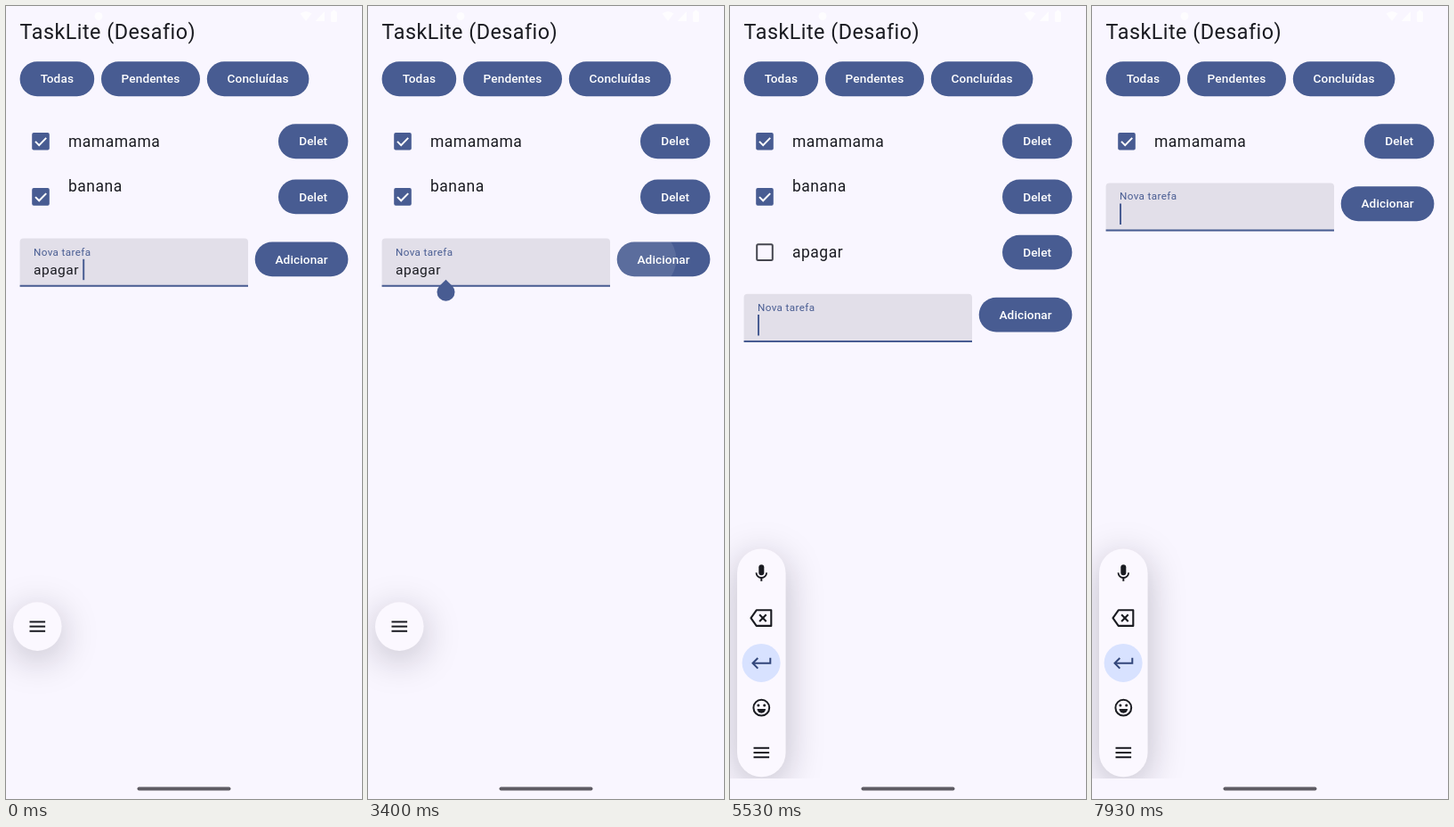
An HTML page with a canvas that plays this animation: 400 by 889 pixels, repeating every 8 s.

```html
<!DOCTYPE html>
<html lang="pt">
<head>
<meta charset="utf-8">
<title>Lista de tarefas</title>
<style>
  html, body { margin: 0; width: 100%; height: 100%; overflow: hidden; background: #f9f6ff; }
  canvas { display: block; width: 400px; height: 889px; }
</style>
</head>
<body>
<canvas id="stage"></canvas>
<script>
const W = 400, H = 889, LOOP = 8000;
const DP = 0.9728;
const BLUE = '#485c92', INK = '#1a1b21', BG = '#f9f6ff';
const ROW0 = 151.7, ROW = 62.2;

// Moments of the story, in ms
const HANDLE = 2470, PRESS = 3365, ADD = 3473, OPEN = 3600, DROP_1 = 6000, DROP_2 = 7870;
const BLINK = 499;

const canvas = document.getElementById('stage');
const ctx = canvas.getContext('2d');
const dpr = window.devicePixelRatio || 1;
canvas.width = W * dpr;
canvas.height = H * dpr;

const clamp = x => Math.max(0, Math.min(1, x));
const mix = (a, b, p) => a + (b - a) * p;
const easeOut = (x, n) => 1 - Math.pow(1 - x, n);

function box(x, y, w, h, r, color) {
  ctx.fillStyle = color;
  ctx.beginPath();
  ctx.roundRect(x, y, w, h, r);
  ctx.fill();
}

function disc(x, y, r, color) {
  ctx.fillStyle = color;
  ctx.beginPath();
  ctx.arc(x, y, r, 0, Math.PI * 2);
  ctx.fill();
}

function line(points, color, width) {
  ctx.strokeStyle = color;
  ctx.lineWidth = width;
  ctx.beginPath();
  points.forEach(([x, y], i) => i ? ctx.lineTo(x, y) : ctx.moveTo(x, y));
  ctx.stroke();
}

// Text whose line box is centred on y; size and spacing in dp
function label(str, x, y, size, spacing, color, weight = 400, align = 'left') {
  const px = size * DP;
  ctx.font = `${weight} ${px}px Roboto, sans-serif`;
  ctx.letterSpacing = spacing * DP + 'px';
  ctx.textAlign = align;
  ctx.fillStyle = color;
  ctx.fillText(str, x, y + px * 0.342);
}

function button(str, x, right, cy, ripple) {
  const w = right - x, h = 38.9, y = cy - h / 2;
  box(x, y, w, h, h / 2, BLUE);
  if (ripple) {
    ctx.save();
    ctx.clip();
    disc(ripple.x, cy, ripple.r, `rgba(255,255,255,${ripple.a})`);
    ctx.restore();
  }
  label(str, x + w / 2, cy, 14, 0.1, '#fff', 500, 'center');
}

function checkbox(cy, checked) {
  if (checked) {
    box(29.2, cy - 9.8, 19.6, 19.6, 2, BLUE);
    line([[33, cy + 0.2], [37.2, cy + 4.4], [45.2, cy - 3.8]], '#fff', 2);
  } else {
    ctx.strokeStyle = '#45464f';
    ctx.lineWidth = 2;
    ctx.beginPath();
    ctx.roundRect(30.2, cy - 8.8, 17.6, 17.6, 1.5);
    ctx.stroke();
  }
}

function statusBar() {
  ctx.globalAlpha = 0.75;
  ctx.fillStyle = '#fff';
  ctx.beginPath();
  ctx.moveTo(337, 17);
  ctx.lineTo(330.5, 8.5);
  ctx.quadraticCurveTo(337, 3.5, 343.5, 8.5);
  ctx.fill();
  ctx.beginPath();
  ctx.moveTo(347.5, 17);
  ctx.lineTo(358, 17);
  ctx.lineTo(358, 6);
  ctx.fill();
  box(365, 6, 7, 12, 1.5, '#fff');
  box(367, 4.5, 3, 2, 0.5, '#fff');
  disc(104, 11.5, 4.5, '#fff');
  ctx.globalAlpha = 1;
}

function task(name, i, checked, twoLines) {
  const cy = ROW0 + i * ROW;
  checkbox(cy, checked);
  label(name, 70, cy - (twoLines ? 11.7 : 0), 18, 0.5, INK);
  button('Delet', 306, 384.4, cy);
}

function field(top, text, cursor, handle) {
  box(15.6, top, 256.4, 54.2, [4, 4, 0, 0], '#e2dfe9');
  box(15.6, top + 52.2, 256.4, 2, 0, BLUE);
  label('Nova tarefa', 31, top + 15, 12, 0.4, BLUE);
  label(text, 31, top + 34.8, 16, 0.5, INK);
  const x = text ? 87.2 : 32;
  if (cursor) box(x - 1, top + 23.2, 2, 23.4, 0, BLUE);
  if (handle) {
    const cy = top + 60.2, r = 10, d = r * Math.SQRT1_2;
    disc(x + 0.3, cy, r, BLUE);
    ctx.beginPath();
    ctx.moveTo(x + 0.3 - d, cy - d);
    ctx.lineTo(x + 0.3, cy - 2 * d);
    ctx.lineTo(x + 0.3 + d, cy - d);
    ctx.fill();
  }
}

const icons = {
  mic(x, y) {
    box(x - 3, y - 9.6, 6, 12, 3, INK);
    ctx.strokeStyle = INK;
    ctx.lineWidth = 1.8;
    ctx.beginPath();
    ctx.arc(x, y - 0.6, 5.8, 0, Math.PI);
    ctx.stroke();
    line([[x, y + 5], [x, y + 9]], INK, 2);
  },
  erase(x, y) {
    ctx.lineJoin = 'round';
    line([[x - 11.8, y], [x - 5.6, y - 8.8], [x + 11, y - 8.8], [x + 11, y + 8.8],
      [x - 5.6, y + 8.8], [x - 11.8, y], [x - 5.6, y - 8.8]], INK, 2.1);
    ctx.lineJoin = 'miter';
    line([[x - 2.2, y - 3.8], [x + 5.4, y + 3.8]], INK, 2.1);
    line([[x + 5.4, y - 3.8], [x - 2.2, y + 3.8]], INK, 2.1);
  },
  enter(x, y) {
    disc(x - 0.2, y, 21.5, '#d8e2ff');
    line([[x + 10, y - 5.6], [x + 10, y + 0.4], [x - 9, y + 0.4]], '#32467a', 2);
    line([[x - 4, y - 5.4], [x - 9.8, y + 0.4], [x - 4, y + 6.2]], '#32467a', 2);
  },
  smile(x, y) {
    ctx.strokeStyle = INK;
    ctx.lineWidth = 2;
    ctx.beginPath();
    ctx.arc(x, y, 8.9, 0, Math.PI * 2);
    ctx.stroke();
    disc(x - 3.4, y - 2.8, 1.5, INK);
    disc(x + 3.4, y - 2.8, 1.5, INK);
    ctx.fillStyle = INK;
    ctx.beginPath();
    ctx.arc(x, y + 1.2, 4.8, 0, Math.PI);
    ctx.fill();
  },
  menu(x, y) {
    for (const d of [-5.2, 0, 5.2]) box(x - 8.8, y + d - 1, 17.6, 2, 0, INK);
  }
};

// Floating toolbar: a disc that unrolls into a pill
function toolbar(x) {
  const first = mix(695.6, 635.8, easeOut(x, 2.32));
  const last = mix(695.6, 837, easeOut(x, 1.92));
  const step = (last - first) / 4;
  ctx.save();
  ctx.beginPath();
  ctx.rect(0, 560, 130, 306);
  ctx.clip();
  ctx.shadowColor = 'rgba(20,15,30,0.25)';
  ctx.shadowBlur = 42 * dpr;
  ctx.shadowOffsetY = 9 * dpr;
  box(8, first - 27.3, 54.6, last - first + 54.6, 27.3, '#fbf8ff');
  ctx.restore();

  const fade = clamp(x * 2 - 0.5);
  const dip = 0.55 + 0.9 * Math.abs(x - 0.5);
  const alphas = {
    mic: clamp(x * 3), erase: x < 1 ? fade : 1, enter: x < 1 ? fade : 1,
    smile: x < 1 ? fade : 1, menu: dip
  };
  Object.keys(icons).forEach((name, i) => {
    ctx.globalAlpha = alphas[name];
    icons[name](35.3, first + step * i);
  });
  ctx.globalAlpha = 1;
}

function rippleAt(t) {
  if (t < PRESS || t > 4130) return null;
  return { x: 312, r: 20 + (t - PRESS) * 0.4, a: 0.1 * clamp((4130 - t) / 420) };
}

function cursorAt(t) {
  if (t < 60) return true;
  const phase = (t - ADD + 10 * BLINK) % (2 * BLINK);
  return phase < BLINK;
}

function draw(t) {
  ctx.setTransform(dpr, 0, 0, dpr, 0, 0);
  ctx.fillStyle = BG;
  ctx.fillRect(0, 0, W, H);
  statusBar();

  label('TaskLite (Desafio)', 15.6, 29, 24, 0.5, INK);
  button('Todas', 15.6, 99.2, 81.7);
  button('Pendentes', 107, 218, 81.7);
  button('Concluídas', 225.8, 340.4, 81.7);

  const added = t >= ADD;
  const count = t >= DROP_2 ? 1 : added && t < DROP_1 ? 3 : 2;
  task('mamamama', 0, true);
  if (count > 1) task('banana', 1, true, true);
  if (count > 2) task('apagar', 2, false);

  const top = 198.4 + (count - 1) * ROW;
  field(top, added ? '' : 'apagar ', cursorAt(t), t >= HANDLE && !added);
  button('Adicionar', 279.7, 384.4, top + 23.3, rippleAt(t));

  toolbar(clamp((t - OPEN) / 400));
  box(147.5, 875.6, 105, 3.9, 2, '#5f5c64');
}

const start = performance.now();
function tick() {
  draw((performance.now() - start) % LOOP);
  requestAnimationFrame(tick);
}
tick();
</script>
</body>
</html>
```
